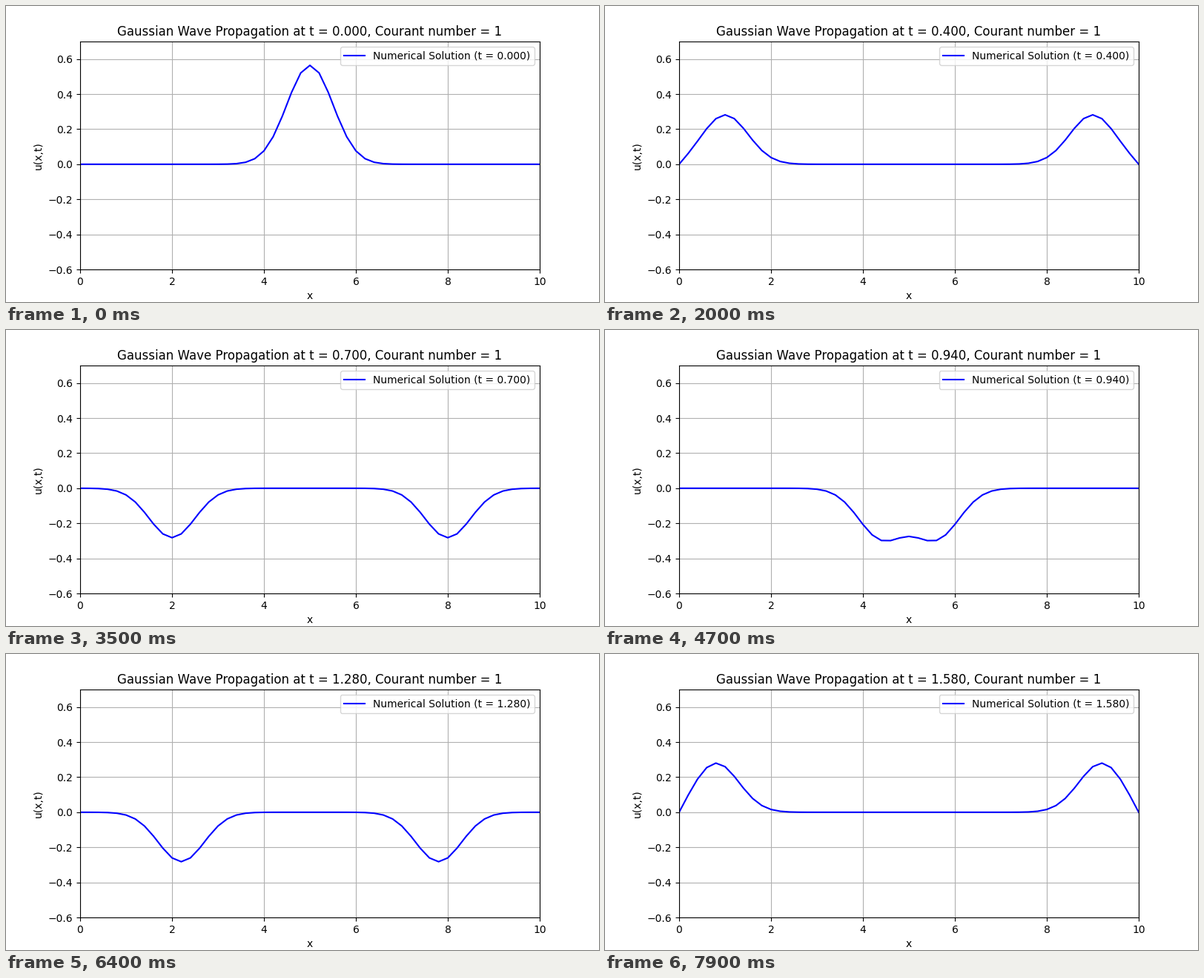
A matplotlib script that plays this animation: 800x400 px, repeating every 8000 ms.

```python
import numpy as np
import matplotlib.pyplot as plt
from matplotlib.animation import FuncAnimation

LENGTH = 10.0
DX = 0.2
SPEED = 10.0
DT = DX / SPEED      # Courant number of 1
FRAMES = 80

x = np.linspace(0, LENGTH, int(round(LENGTH / DX)) + 1)


def pulse(s):
    """Gaussian start shape, continued oddly with period 2 * LENGTH."""
    s = np.mod(s, 2 * LENGTH)
    sign = np.where(s > LENGTH, -1.0, 1.0)
    s = np.where(s > LENGTH, 2 * LENGTH - s, s)
    return sign * np.exp(-2 * (s - LENGTH / 2) ** 2) / np.sqrt(np.pi)


def wave(t):
    """Two half-height pulses running apart between fixed ends."""
    u = 0.5 * (pulse(x - SPEED * t) + pulse(x + SPEED * t))
    u[0] = u[-1] = 0
    return u


def title_text(t):
    return f"Gaussian Wave Propagation at t = {t:.3f}, Courant number = 1"


def label_text(t):
    return f"Numerical Solution (t = {t:.3f})"


fig, ax = plt.subplots(figsize=(8, 4), dpi=100)
line, = ax.plot(x, wave(0), color="blue", label=label_text(0))
ax.set_xlim(0, LENGTH)
ax.set_ylim(-0.6, 0.7)
ax.set_xlabel("x")
ax.set_ylabel("u(x,t)")
ax.grid(True)
title = ax.set_title(title_text(0))
label = ax.legend(loc="upper right").get_texts()[0]


def update(i):
    t = i * DT
    line.set_ydata(wave(t))
    title.set_text(title_text(t))
    label.set_text(label_text(t))
    return line, title, label


anim = FuncAnimation(fig, update, frames=FRAMES, interval=100, repeat=True)
plt.show()
```
